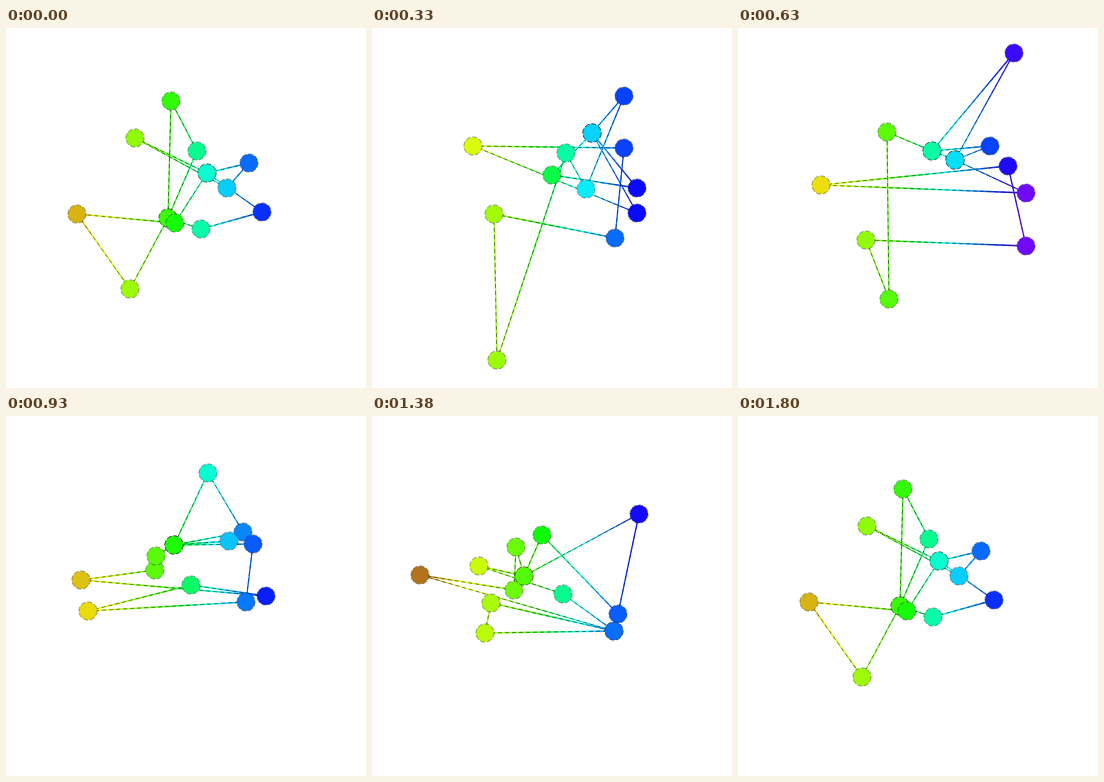
These frames come from a looping animation (360x360 px, 1.83 s). An HTML page with a canvas:

```html
<!DOCTYPE html>
<html lang="en">
<head>
<meta charset="utf-8">
<title>Drifting chain</title>
<style>
  html, body { margin: 0; width: 100%; height: 100%; overflow: hidden; background: #fff; }
  canvas { display: block; width: 360px; height: 360px; }
</style>
</head>
<body>
<canvas width="360" height="360"></canvas>
<script>
const ctx = document.querySelector('canvas').getContext('2d');
const SIZE = 360, LOOP = 1830, STEP = 30, PERIOD = 1800, RADIUS = 9.1;

// A pose lists the balls in chain order; a bare index means "same place as that ball".
const pose = (time, ...balls) => ({
  time,
  balls: balls.map(b => Array.isArray(b) ? b : balls[b])
});

const poses = [
  pose(0, [71, 186], [124, 261], [162, 190], [191, 123], [165, 73], 2, [195, 201],
    [256, 184], 12, [243, 135], [221, 160], [129, 110], [201, 145], [169, 195]),
  pose(330, [122, 186], [125, 332], [194, 125], [214, 161], [252, 68], 8, [180, 147],
    [265, 160], [220, 105], 8, [265, 185], [101, 118], [252, 120], [243, 210]),
  pose(630, [128, 212], [151, 271], [149, 104], [194, 123], [276, 25], [217, 132], 3,
    [252, 118], 5, 5, [288, 165], [83, 157], [270, 138], [288, 218]),
  pose(930, [75, 164], [149, 154], [150, 140], [168, 129], [202, 57], [237, 116], 3,
    [223, 125], 3, [247, 128], [240, 186], [82, 195], [185, 169], [260, 180]),
  pose(1170, [47, 142], [138, 143], [145, 145], [169, 190], [280, 84], 10, [170, 134],
    [229, 156], [150, 129], 7, [247, 199], [97, 198], [122, 164], [238, 222]),
  pose(1380, [48, 159], [142, 174], [144, 131], [152, 160], [267, 98], [246, 198], [170, 119],
    3, [107, 150], [191, 178], [242, 215], [113, 217], [119, 187], 10)
];
const count = poses[0].balls.length;

const clamp = (v, low, high) => Math.max(low, Math.min(high, v));
const ramp = (v, from, to) => clamp((v - from) / (to - from), 0, 1);

// The hue runs from brown on the left to violet on the right, quickest near the middle.
function colourAt(x) {
  const hue = 33 + 77 * ramp(x, 47, 165) + 58 * ramp(x, 165, 200) + 100 * ramp(x, 200, 290);
  const glow = ramp(x, 47, 95);
  return `hsl(${hue}, ${72 + 25 * glow}%, ${41 + 10 * glow}%)`;
}

const rainbow = ctx.createLinearGradient(0, 0, SIZE, 0);
for (let x = 0; x <= SIZE; x += 15) rainbow.addColorStop(x / SIZE, colourAt(x));

// Pose by index, wrapping around the loop
function key(i) {
  const n = poses.length, turn = Math.floor(i / n), p = poses[i - turn * n];
  return { time: p.time + turn * PERIOD, balls: p.balls };
}

// Smooth tangent that never overshoots a turning point
function tangent(a, b, c, ball, axis) {
  const va = a.balls[ball][axis], vb = b.balls[ball][axis], vc = c.balls[ball][axis];
  const left = (vb - va) / (b.time - a.time), right = (vc - vb) / (c.time - b.time);
  if (left * right <= 0) return 0;
  const limit = 3 * Math.min(Math.abs(left), Math.abs(right));
  return clamp((left + right) / 2, -limit, limit);
}

function ballsAt(t) {
  let i = poses.length - 1;
  while (poses[i].time > t) i--;
  const [a, b, c, d] = [-1, 0, 1, 2].map(n => key(i + n));
  const span = c.time - b.time, s = (t - b.time) / span;
  const s2 = s * s, s3 = s2 * s, h = 3 * s2 - 2 * s3;
  const place = (ball, axis) =>
    b.balls[ball][axis] * (1 - h) + c.balls[ball][axis] * h +
    span * ((s3 - 2 * s2 + s) * tangent(a, b, c, ball, axis) +
            (s3 - s2) * tangent(b, c, d, ball, axis));
  return Array.from({ length: count }, (_, n) => [place(n, 0), place(n, 1)]);
}

function stroke(style, width, dash = []) {
  ctx.strokeStyle = style;
  ctx.lineWidth = width;
  ctx.setLineDash(dash);
  ctx.stroke();
}

// A thin coloured thread, speckled with dark dashes
function link(p, q) {
  ctx.beginPath();
  ctx.moveTo(...p);
  ctx.lineTo(...q);
  stroke(rainbow, 1.3);
  stroke('rgba(25, 35, 30, .6)', 0.9, [4, 3]);
}

function disc([x, y]) {
  ctx.beginPath();
  ctx.arc(x, y, RADIUS, 0, Math.PI * 2);
  ctx.fillStyle = colourAt(x);
  ctx.fill();
  stroke('rgba(20, 30, 20, .55)', 0.8, [5, 2]);
}

function draw() {
  const t = Math.floor(performance.now() % LOOP / STEP) * STEP;
  const balls = ballsAt(t % PERIOD);
  ctx.fillStyle = '#fff';
  ctx.fillRect(0, 0, SIZE, SIZE);
  balls.forEach((p, i) => link(p, balls[(i + 1) % count]));
  balls.forEach(disc);
  requestAnimationFrame(draw);
}
draw();
</script>
</body>
</html>
```
